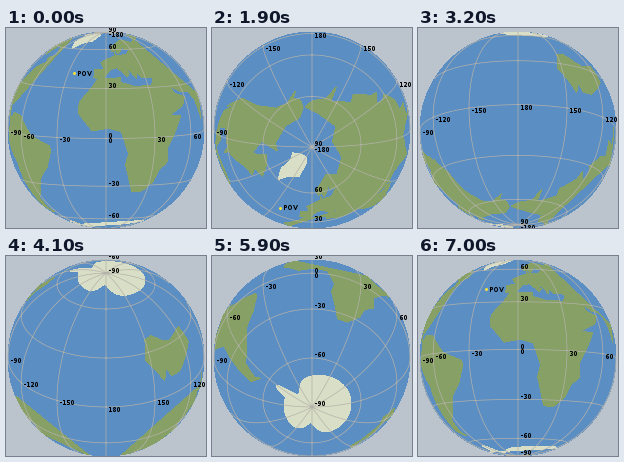
A matplotlib script for the animation above (7100 ms loop, 200 by 200 pixels).

```python
import numpy as np
import matplotlib.pyplot as plt
from matplotlib.animation import FuncAnimation
from matplotlib.patches import Circle, Polygon

FRAMES, STEP = 71, 5          # STEP: degrees of tilt per frame
PX = 1 / 98                   # one pixel, in globe radii
SKY, SEA, LAND, ICE, GRID = "#bbc4cc", "#5b8ec3", "#86a066", "#d9dec6", "#b5b2aa"

# Key points of each coast as (longitude, latitude)
AFRICA = [
    (-6, 36), (-10, 30), (-17, 21), (-17, 14.7), (-8, 4.4), (1.5, 6.1), (9, 4),
    (13.5, -9), (12, -16), (18.3, -34), (26, -34), (33, -27), (35, -20), (40.5, -15),
    (39, -6.5), (51, 11.8), (43, 12), (33, 29.5), (32, 31.2), (20, 31), (10.5, 34),
    (10.8, 37)]
ASIA = [
    (33, 31), (34, 28), (43, 13), (55, 17.5), (59.8, 22.5), (51, 25), (48, 30),
    (57, 26), (67, 25), (73, 20), (77.5, 8), (80, 15), (91, 22.5), (98, 16),
    (104, 1.4), (100, 13), (109, 11.5), (107, 21), (114, 22.5), (122, 30), (119, 35),
    (121, 40), (126.5, 34.5), (128, 40), (140, 49), (137, 54), (157, 61), (157, 51),
    (163, 60), (179, 62.5), (-170, 66), (170, 69.8), (130, 71.5), (104, 77.5),
    (70, 71), (44, 68), (40, 65), (41, 67)]
EUROPE = [
    (26, 71), (5, 61.5), (7, 58), (11, 59), (13, 56), (18, 60), (22, 65.5), (22, 60),
    (29, 60), (21, 55), (10, 54), (9, 57), (8.5, 54), (-4.6, 48.4), (-1.5, 43.4),
    (-9, 43), (-9, 37), (-2, 36.8), (3.5, 43), (9, 44.4), (16, 38), (18, 40),
    (12.5, 45), (19.5, 41.5), (22.5, 36.5), (24, 40.5), (27, 37), (36, 36.5)]
NORTH_AMERICA = [
    (-167, 66), (-156.5, 71.3), (-128, 70), (-95, 68), (-82, 69), (-94, 59),
    (-80, 51.5), (-78, 62), (-65, 59), (-56, 52.5), (-66, 50), (-61, 46), (-70, 43),
    (-76, 36), (-81, 31), (-80.2, 25.5), (-84, 30), (-97, 27.5), (-95, 18.5),
    (-88, 21), (-84, 15), (-83, 10), (-77, 8.5), (-80, 7.5), (-95, 16), (-106, 21),
    (-114, 31), (-110, 23), (-121, 34.5), (-124, 47), (-136, 58.5), (-150, 60),
    (-163, 55), (-158, 59), (-166, 61.5)]
SOUTH_AMERICA = [
    (-77.5, 8), (-72, 12), (-62, 10.6), (-50, 0), (-35.2, -5.5), (-35, -9),
    (-39, -18), (-48, -26), (-57, -37), (-65, -42), (-69, -51), (-66, -55),
    (-75, -50), (-70.3, -18.3), (-81, -5)]
AUSTRALIA = [
    (142.5, -10.8), (153, -26), (150, -37.5), (144, -38.7), (137, -34), (131, -31.5),
    (116, -35), (113.5, -24), (122, -18), (130, -12), (136.8, -12), (140, -17.5)]
GREENLAND = [
    (-44, 60), (-39, 65.5), (-23, 70), (-18, 80), (-32, 83.3), (-60, 82), (-72, 78),
    (-58, 75.5), (-53, 67)]


def antarctica():
    """A lopsided cap with two bays and one peninsula."""
    lon = np.arange(0, 360, 3)

    def bump(centre, width):
        return np.exp(-((lon - centre) / width) ** 2)

    size = (20 + 3.5 * np.cos(np.radians(lon - 100))
            - 9 * bump(183, 17) - 6 * bump(318, 17) + 10 * bump(299, 6))
    return list(zip(lon, size - 90))


def sphere(lon, lat):
    lon, lat = np.radians(lon), np.radians(lat)
    return np.stack([np.cos(lat) * np.cos(lon), np.cos(lat) * np.sin(lon),
                     np.sin(lat) + 0 * lon], axis=-1)


def coast(points):
    """Dense ring of unit vectors through the key points."""
    corners = sphere(*np.array(points, float).T)
    t = np.linspace(0, 1, 12, endpoint=False)[:, None]
    ring = np.concatenate([a + (b - a) * t
                           for a, b in zip(corners, np.roll(corners, -1, axis=0))])
    return ring / np.linalg.norm(ring, axis=1, keepdims=True)


def view(v, tilt):
    """Orthographic x, y and depth with the given latitude at the centre."""
    c, s = np.cos(tilt), np.sin(tilt)
    return v[..., 1], v[..., 2] * c - v[..., 0] * s, v[..., 2] * s + v[..., 0] * c


def graticule():
    gap = np.full((1, 3), np.nan)
    lines = []
    for lon in range(-180, 180, 30):
        lines += [sphere(lon, np.linspace(-90, 90, 91)), gap]
    for lat in range(-60, 90, 30):
        lines += [sphere(np.linspace(-180, 180, 181), lat), gap]
    return np.concatenate(lines)


# Crisp, pixel-fitted lettering
plt.rcParams.update({"text.hinting": "default", "text.hinting_factor": 1,
                     "font.family": "DejaVu Sans", "font.size": 5.04})
fig = plt.figure(figsize=(2, 2), dpi=100, facecolor=SKY)
ax = fig.add_axes([0, 0, 1, 1])
ax.set_xlim(-100 * PX, 100 * PX)
ax.set_ylim(-98 * PX, 102 * PX)
ax.axis("off")

ax.add_patch(Circle((0, 0), 1, fc=SEA, ec="none", aa=False, zorder=1))
shores = []
for points, color in [(AFRICA, LAND), (ASIA + EUROPE, LAND), (NORTH_AMERICA, LAND),
                      (SOUTH_AMERICA, LAND), (AUSTRALIA, LAND), (GREENLAND, ICE),
                      (antarctica(), ICE)]:
    patch = Polygon(np.zeros((3, 2)), fc=color, ec="none", aa=False, zorder=2)
    shores.append((ax.add_patch(patch), coast(points)))

net = graticule()
grid, = ax.plot([], [], color=GRID, lw=0.5, zorder=3)

POV = sphere(-25, 40)
spot, = ax.plot([], [], "o", color="#ffe62e", ms=2.1, mew=0, zorder=4)

labels = []


def add_label(text, lon, lat, dx, dy):
    item = ax.text(0, 0, text, color="black", va="baseline", zorder=5)
    labels.append((item, sphere(lon, lat), dx * PX, dy * PX))


for lat in range(-90, 91, 30):
    add_label(str(lat), 0, lat, 2, 0.6)
for lon in range(-150, 181, 30):
    add_label(str(lon), lon, 0, 2, -4.9)
add_label("-180", 0, 90, 2, -4.9)
add_label("POV", -25, 40, 3, -2.4)


def draw(i):
    tilt = np.radians(STEP * (i + 1))
    for patch, ring in shores:
        x, y, z = view(ring, tilt)
        near = z >= 0
        # Points beyond the horizon drop out; a chord closes the shape.
        patch.set_visible(near.sum() > 2)
        if near.sum() > 2:
            patch.set_xy(np.column_stack([x, y])[near])
    x, y, z = view(net, tilt)
    hidden = ~(z > -1e-6)
    grid.set_data(np.where(hidden, np.nan, x), np.where(hidden, np.nan, y))
    x, y, z = view(POV, tilt)
    spot.set_data([x], [y])
    spot.set_visible(bool(z > 0))
    for item, place, dx, dy in labels:
        x, y, z = view(place, tilt)
        item.set_position((x + dx, y + dy))
        item.set_visible(bool(z > -1e-6))
    return [grid, spot]


anim = FuncAnimation(fig, draw, frames=FRAMES, interval=100, repeat=True)
plt.show()
```
